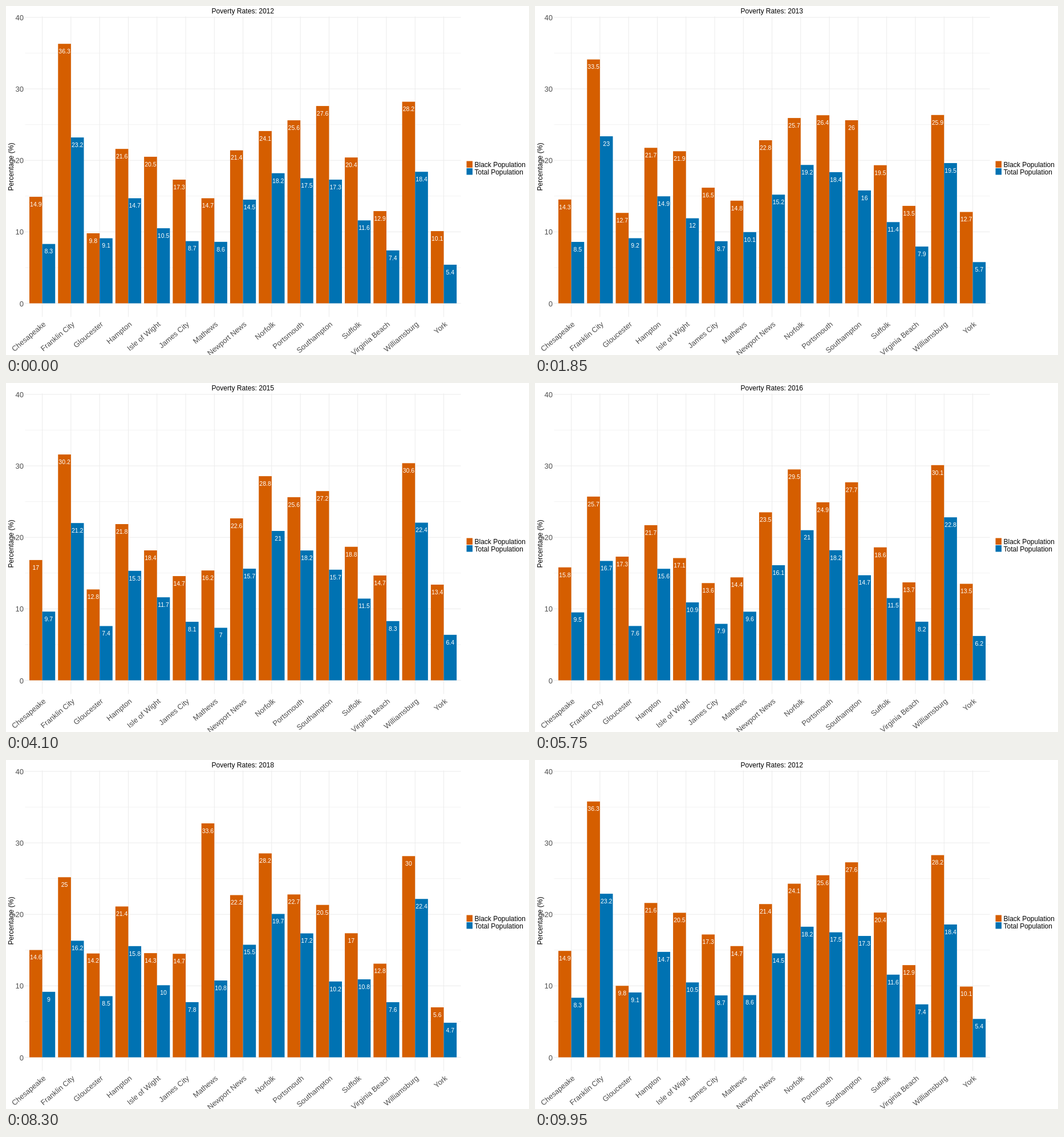
These frames come from a looping animation (917 by 611 pixels, 10000 ms). An HTML page:

```html
<!DOCTYPE html>
<html lang="en">
<head>
<meta charset="utf-8">
<title>Poverty Rates</title>
<style>
  html, body { margin: 0; width: 100%; height: 100%; overflow: hidden; background: #fff; }
  svg { display: block; font-family: "Liberation Sans", Arial, sans-serif; }
</style>
</head>
<body>
<svg id="chart" width="917" height="611" viewBox="0 0 917 611"></svg>
<script>
const svg = document.getElementById('chart');
const ORANGE = '#d55e00', BLUE = '#0072b2';
const LOOP = 10000, STEP = 50, FIRST_YEAR = 2012;
// Each move leads to the next year, the last one back to the first.
const moveStarts = [250, 1700, 3150, 4600, 6050, 7500, 8900];
const moveLengths = [1150, 1150, 1150, 1150, 1150, 1100, 1100];

const SLOT = 50.28, BAR = SLOT * 0.45;
const panel = { left: 33.4, right: 797.6, top: 18.5, bottom: 544.4 };
const yOf = value => 520.5 - value * 12.515;

function add(tag, attributes, text = '') {
  const node = document.createElementNS('http://www.w3.org/2000/svg', tag);
  for (const name in attributes) node.setAttribute(name, attributes[name]);
  node.textContent = text;
  return svg.appendChild(node);
}

function line(x1, y1, x2, y2, width) {
  add('line', { x1, y1, x2, y2, stroke: '#ebebeb', 'stroke-width': width });
}

function label(text, x, y, size, fill, anchor = 'start', angle = 0) {
  return add('text', {
    x, y, fill, 'font-size': size, 'text-anchor': anchor,
    transform: `rotate(${angle} ${x} ${y})`
  }, text);
}

// Horizontal grid and value axis
for (let value = 0; value <= 40; value += 5) {
  const major = value % 10 === 0;
  line(panel.left, yOf(value), panel.right, yOf(value), major ? 1 : 0.6);
  if (major) label(value, 31, yOf(value) + 5, 13, '#4d4d4d', 'end');
}

const bars = [];
let count = 0;

function addBar(x, fill, values) {
  const rect = add('rect', { x, width: BAR, fill });
  const text = label('', x + BAR / 2, 0, 10.5, '#fff', 'middle');
  text.removeAttribute('transform');
  bars.push({ rect, text, values });
}

function place(name, black, total) {
  const x = 63.6 + SLOT * count++;
  line(x, panel.top, x, panel.bottom, 1);
  label(name, x + 7, 558.5, 13, '#4d4d4d', 'end', -40);
  addBar(x - BAR, ORANGE, black);
  addBar(x, BLUE, total);
}

// Values per year, 2012 to 2018
place('Chesapeake', [14.9, 14.3, 16, 17, 15.8, 16.1, 14.6], [8.3, 8.5, 9.2, 9.7, 9.5, 9.6, 9]);
place('Franklin City', [36.3, 33.5, 38.2, 30.2, 25.7, 25.7, 25], [23.2, 23, 25.8, 21.2, 16.7, 16.6, 16.2]);
place('Gloucester', [9.8, 12.7, 12.3, 12.8, 17.3, 15.4, 14.2], [9.1, 9.2, 8.5, 7.4, 7.6, 8.7, 8.5]);
place('Hampton', [21.6, 21.7, 22.1, 21.8, 21.7, 20.3, 21.4], [14.7, 14.9, 15.4, 15.3, 15.6, 14.9, 15.8]);
place('Isle of Wight', [20.5, 21.9, 17.1, 18.4, 17.1, 15.3, 14.3], [10.5, 12, 11.2, 11.7, 10.9, 10.3, 10]);
place('James City', [17.3, 16.5, 14, 14.7, 13.6, 13.9, 14.7], [8.7, 8.7, 8.6, 8.1, 7.9, 7.5, 7.8]);
place('Mathews', [14.7, 14.8, 11.4, 16.2, 14.4, 30.4, 33.6], [8.6, 10.1, 9, 7, 9.6, 10.6, 10.8]);
place('Newport News', [21.4, 22.8, 22.9, 22.6, 23.5, 24, 22.2], [14.5, 15.2, 15.2, 15.7, 16.1, 16.4, 15.5]);
place('Norfolk', [24.1, 25.7, 27.4, 28.8, 29.5, 29.4, 28.2], [18.2, 19.2, 20.4, 21, 21, 21, 19.7]);
place('Portsmouth', [25.6, 26.4, 25.7, 25.6, 24.9, 23, 22.7], [17.5, 18.4, 18, 18.2, 18.2, 17.7, 17.2]);
place('Southampton', [27.6, 26, 23, 27.2, 27.7, 23.5, 20.5], [17.3, 16, 14.4, 15.7, 14.7, 11.7, 10.2]);
place('Suffolk', [20.4, 19.5, 18.1, 18.8, 18.6, 18.3, 17], [11.6, 11.4, 11.1, 11.5, 11.5, 11.2, 10.8]);
place('Virginia Beach', [12.9, 13.5, 14.5, 14.7, 13.7, 13.9, 12.8], [7.4, 7.9, 8.2, 8.3, 8.2, 8, 7.6]);
place('Williamsburg', [28.2, 25.9, 29.3, 30.6, 30.1, 23.2, 30], [18.4, 19.5, 20.4, 22.4, 22.8, 21.5, 22.4]);
place('York', [10.1, 12.7, 13.3, 13.4, 13.5, 10.7, 5.6], [5.4, 5.7, 6.2, 6.4, 6.2, 5.2, 4.7]);

const title = label('', 415.3, 13, 12.1, '#000', 'middle');
label('Percentage (%)', 13, 281.5, 12.1, '#000', 'middle', -90);

function legend(name, fill, y) {
  add('rect', { x: 807.5, y, width: 10.5, height: 11.5, fill });
  label(name, 821.5, y + 10.7, 12, '#000');
}
legend('Black Population', ORANGE, 271.5);
legend('Total Population', BLUE, 284);

function draw(now) {
  const time = Math.floor((now % LOOP) / STEP) * STEP;
  const move = Math.max(0, moveStarts.findLastIndex(start => start <= time));
  const next = (move + 1) % moveStarts.length;
  const progress = Math.min(1, Math.max(0, (time - moveStarts[move]) / moveLengths[move]));
  const closest = progress < 0.5 ? move : next;

  title.textContent = `Poverty Rates: ${FIRST_YEAR + closest}`;
  for (const { rect, text, values } of bars) {
    const top = yOf(values[move] + (values[next] - values[move]) * progress);
    rect.setAttribute('y', top);
    rect.setAttribute('height', yOf(0) - top);
    text.setAttribute('y', top + 16.8);
    text.textContent = values[closest];
  }
  requestAnimationFrame(draw);
}
draw(performance.now());
</script>
</body>
</html>
```
